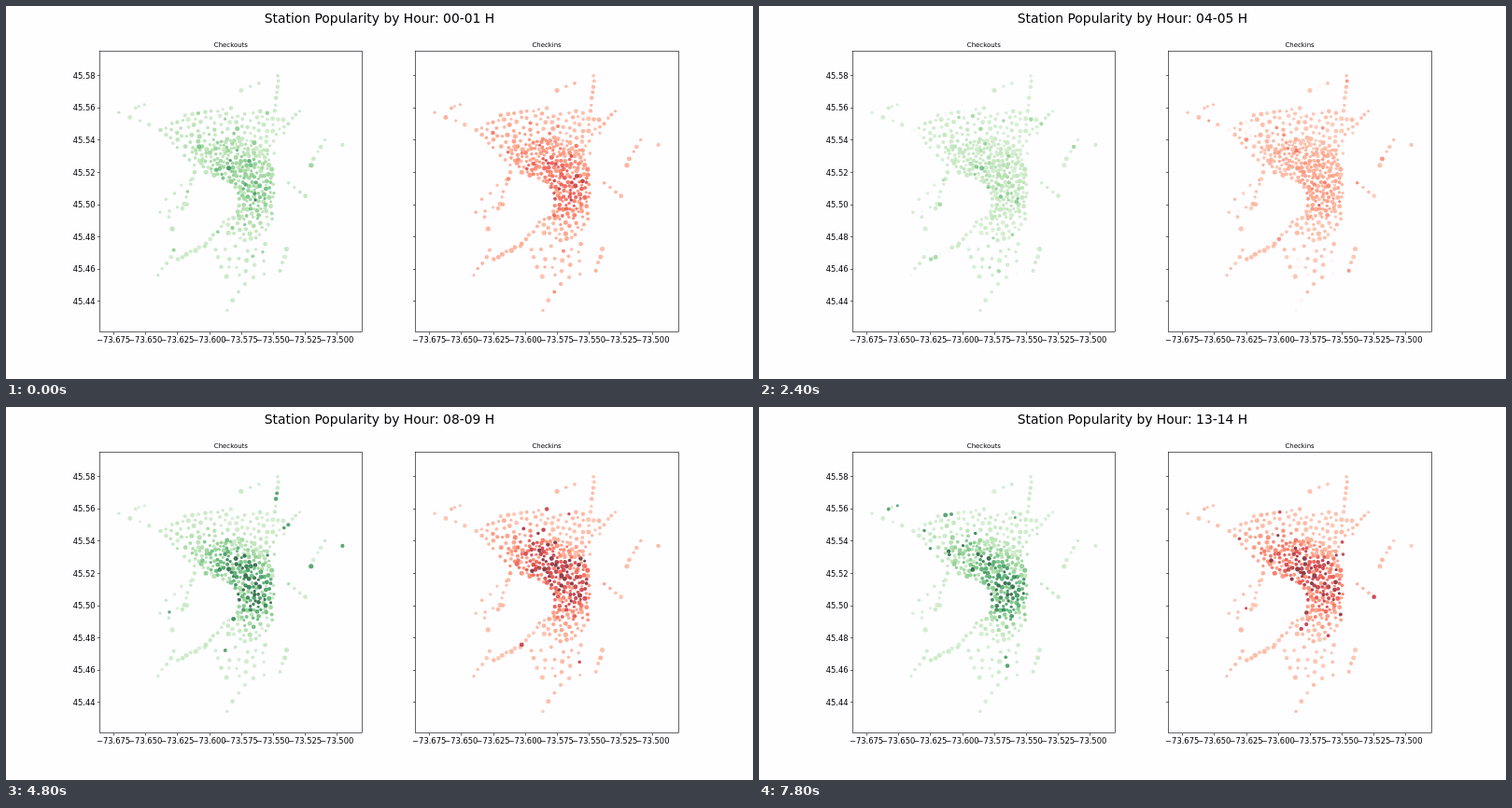
Write an HTML page with a canvas that moves like this. It is 800x400 px and loops after 8000 ms.

```html
<!DOCTYPE html>
<html lang="en">
<head>
<meta charset="utf-8">
<title>Station Popularity by Hour</title>
<style>
  html, body { margin: 0; width: 100%; height: 100%; overflow: hidden; background: #fefdff; }
  canvas { display: block; }
</style>
</head>
<body>
<canvas id="stage" width="800" height="400"></canvas>
<script>
const ctx = document.getElementById('stage').getContext('2d');
const LOOP = 8000, HOUR = 600, HOURS = 14, PANEL_SHIFT = 338.18;

// Rows of stations along outlying streets: x1, y1, x2, y2, count
const streets = [
  [292, 74, 287, 112, 7], [270, 82, 252, 91, 3], [314, 112, 298, 130, 5], [192, 117, 240, 110, 8],
  [121, 114, 165, 133, 5], [138, 110, 148, 105, 3],
  [361, 148, 361, 148, 1], [342, 144, 326, 170, 5], [302, 190, 320, 204, 4], [301, 261, 293, 283, 4],
  [202, 179, 188, 218, 7], [197, 186, 172, 207, 4], [193, 213, 165, 222, 4], [175, 227, 178, 239, 2],
  [163, 289, 180, 262, 5], [184, 271, 212, 257, 7], [214, 255, 238, 228, 7], [236, 326, 255, 298, 4]
];

// Filled areas: outline and smallest gap between stations
const areas = [
  ['M195 152L222 148 240 140 262 142 282 156 286 180 288 200 284 216 270 228 246 230 250 212 247 196 236 187 215 180Z', 3.4],
  ['M165 131L180 125 200 120 222 117 255 112 284 112 301 124 298 138 288 150 287 165 270 165 210 178 186 156Z', 5.3],
  ['M233 235L246 222 280 222 287 214 287 228 272 250 255 252 238 246Z', 4.8],
  ['M222 262L240 250 268 250 284 256 278 288 255 298 226 288Z', 7.5]
];

// Heat of the northern and southern hot spots, at midnight and by day
const panels = [
  { title: 'Checkouts', ramp: 'f7fcf5 e5f5e0 c7e9c0 a1d99b 74c476 41ab5d 238b45 006d2c 00441b',
    base: .21, night: [.25, .3], day: [.52, .78] },
  { title: 'Checkins', ramp: 'fff5f0 fee0d2 fcbba1 fc9272 fb6a4a ef3b2c cb181d a50f15 67000d',
    base: .24, night: [.3, .42], day: [.66, .5] }
];

const noise = (a, b) => {
  const n = Math.sin(a * 12.9898 + b * 78.233) * 43758.5453;
  return n - Math.floor(n);
};
let seed = 7;
const random = () => (seed = seed * 16807 % 2147483647) / 2147483647;

const stations = [];
const addStation = (x, y) => stations.push({ x, y, r: 1.5 + 1.1 * random(), popularity: random() });

for (const [x1, y1, x2, y2, count] of streets) {
  for (let i = 0; i < count; i++) {
    const k = i / (count - 1 || 1);
    addStation(x1 + (x2 - x1) * k + random() * 2 - 1, y1 + (y2 - y1) * k + random() * 2 - 1);
  }
}
for (const [outline, gap] of areas) {
  const path = new Path2D(outline);
  for (let i = 0; i < 9000; i++) {
    const x = 160 + random() * 145, y = 105 + random() * 195;
    if (ctx.isPointInPath(path, x, y) && stations.every(s => Math.hypot(s.x - x, s.y - y) > gap)) addStation(x, y);
  }
}

function hotSpots({ x, y }) {
  const dx = x - 242, dy = y - 167;
  const along = (dx * .9 + dy * .43) / 32, across = (dy * .9 - dx * .43) / 15;
  return [Math.exp(-(along ** 2 + across ** 2) / 2),
          Math.exp(-(((x - 265) / 16) ** 2 + ((y - 206) / 18) ** 2) / 2)];
}

// Night traffic fades out, then the morning rush sets in around seven
function valueAt(panel, station, hour, n) {
  const night = Math.exp(-hour / 5), rush = 1 / (1 + Math.exp((6.8 - hour) * 4));
  const remote = Math.hypot(station.x - 250, station.y - 185) > 75;
  if (remote && hour > 1 && hour < 6 && n < .15) return .03;
  const mix = .6 * station.popularity + .4 * n;
  const heat = hotSpots(station).reduce((sum, spot, i) =>
    sum + spot * (panel.night[i] * night + panel.day[i] * rush), 0);
  const surge = n > .96 ? .15 + .3 * rush : 0;
  return panel.base + .08 * night + .04 * rush + (n - .5) * .08 + heat * (.15 + 1.3 * mix ** 1.3) + surge;
}

function colour(ramp, value) {
  const stops = ramp.split(' ');
  const p = Math.max(0, Math.min(1, value)) * 8, i = Math.min(7, Math.floor(p));
  const channel = (k, c) => parseInt(stops[k].slice(c * 2, c * 2 + 2), 16);
  return `rgb(${[0, 1, 2].map(c => Math.round(channel(i, c) + (channel(i + 1, c) - channel(i, c)) * (p - i)))})`;
}

panels.forEach((panel, index) => {
  panel.colours = Array.from({ length: HOURS }, (_, hour) => stations.map((s, i) =>
    colour(panel.ramp, valueAt(panel, s, hour, noise(i + 1, hour * 2 + index + 1)))));
});

function text(string, x, y, size, align = 'center') {
  ctx.font = `${size}px "DejaVu Sans", sans-serif`;
  ctx.textAlign = align;
  ctx.fillText(string, x, y);
}

function line(x1, y1, x2, y2) {
  ctx.beginPath();
  ctx.moveTo(x1, y1);
  ctx.lineTo(x2, y2);
  ctx.stroke();
}

const snap = v => Math.round(v) + .5;

function drawPanel(panel, index, hour) {
  const shift = index * PANEL_SHIFT, left = snap(100 + shift);
  ctx.globalAlpha = .75;
  stations.forEach((s, i) => {
    ctx.fillStyle = panel.colours[hour][i];
    ctx.beginPath();
    ctx.arc(s.x + shift, s.y, s.r, 0, 7);
    ctx.fill();
  });
  ctx.globalAlpha = 1;
  ctx.fillStyle = ctx.strokeStyle = '#000';
  ctx.lineWidth = .6;
  ctx.strokeRect(left, 48.5, snap(381.82 + shift) - left - (index ? 0 : 1), 301);
  text(panel.title, 240.9 + shift, 44.4, 6.94);
  for (let i = 0; i < 8; i++) {
    const x = 115 + 34.17 * i + shift, y = 74.6 + 34.6 * i;
    line(snap(x), 350, snap(x), 352.5);
    line(left - 2.5, snap(y - .5), left, snap(y - .5));
    text('\u2212' + (73.675 - .025 * i).toFixed(3), x, 360.8, 8.33);
    if (!index) text((45.58 - .02 * i).toFixed(2), 95.6, y + 3.1, 8.33, 'right');
  }
}

const pad = n => String(n).padStart(2, '0');

function draw() {
  const hour = Math.floor(performance.now() % LOOP / HOUR);
  ctx.fillStyle = '#fefdff';
  ctx.fillRect(0, 0, 800, 400);
  panels.forEach((panel, index) => drawPanel(panel, index, hour));
  text(`Station Popularity by Hour: ${pad(hour)}-${pad(hour + 1)} H`, 400, 18.2, 13.89);
  requestAnimationFrame(draw);
}
draw();
</script>
</body>
</html>
```
